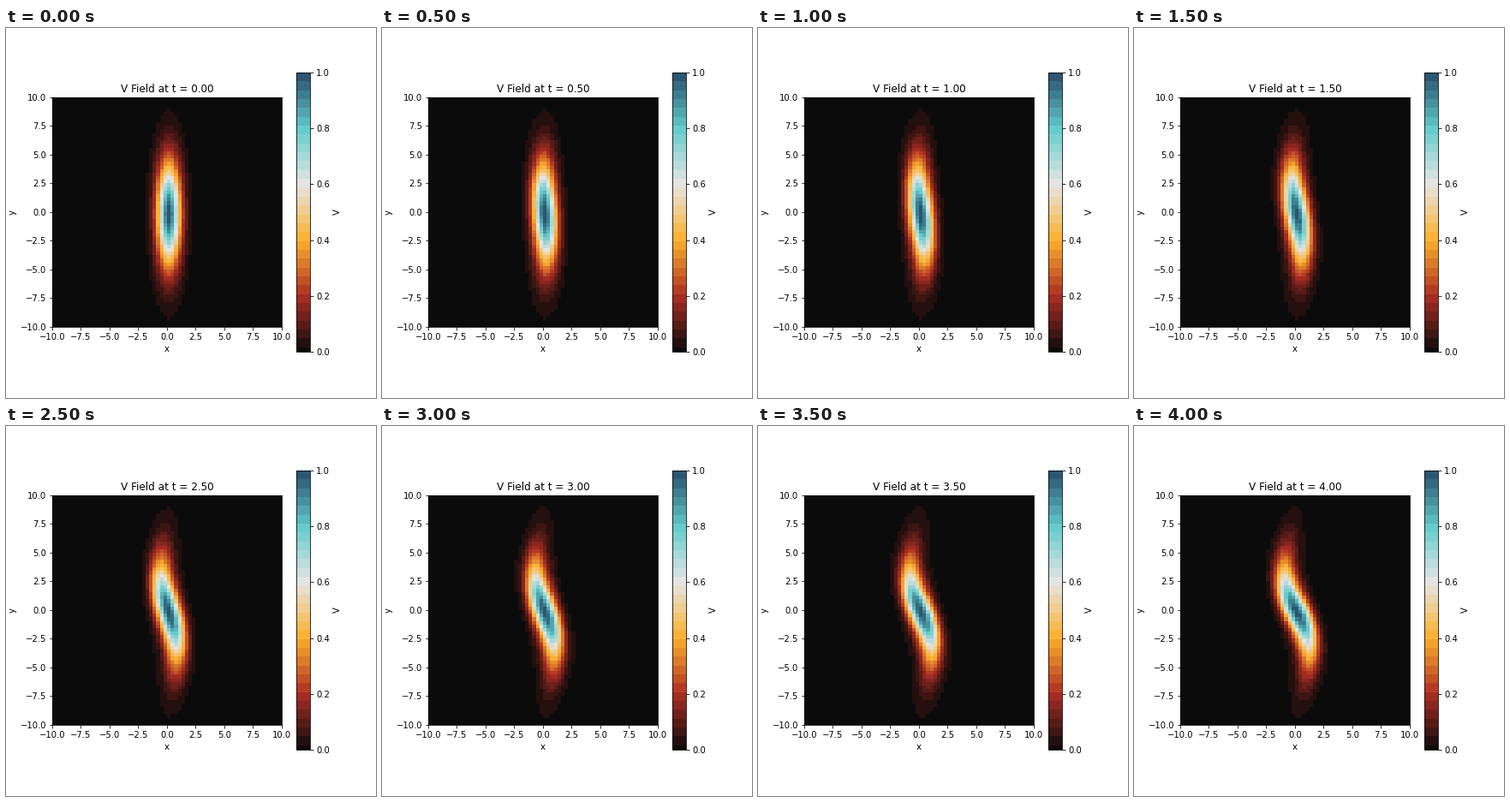
Write a matplotlib script that moves like this. It is 432 by 432 pixels and loops after 4500 ms.

```python
import numpy as np
import matplotlib.pyplot as plt
from matplotlib.animation import FuncAnimation
from matplotlib.colors import LinearSegmentedColormap, ListedColormap

N, SIDE, NU = 64, 20.0, 0.001
H = SIDE / N
STEP, SUBSTEPS, FRAMES = 0.5, 20, 9

grid = np.arange(N) * H - SIDE / 2
X, Y = np.meshgrid(grid, grid)
k = 2 * np.pi * np.fft.fftfreq(N, H)
KX, KY = np.meshgrid(k, k)
K2 = KX**2 + KY**2
K2[0, 0] = 1.0


def diff(f, axis):
    return (np.roll(f, -1, axis) - np.roll(f, 1, axis)) / (2 * H)


def laplacian(f):
    near = sum(np.roll(f, s, a) for s in (-1, 1) for a in (0, 1))
    return (near - 4 * f) / H**2


def rate(w):
    """Vorticity advection plus weak diffusion, rows running downwards."""
    spec = -np.fft.fft2(w) / K2
    spec[0, 0] = 0
    psi = np.fft.ifft2(spec).real
    turn = diff(psi, 1) * diff(w, 0) - diff(psi, 0) * diff(w, 1)
    return turn + NU * laplacian(w)


def advance(w):
    dt = STEP / SUBSTEPS
    for _ in range(SUBSTEPS):
        a = rate(w)
        b = rate(w + dt / 2 * a)
        c = rate(w + dt / 2 * b)
        d = rate(w + dt * c)
        w = w + dt / 6 * (a + 2 * b + 2 * c + d)
    return w


def banded_map():
    """Smooth ramp cut into a half-width first band and 31 full ones."""
    ramp = LinearSegmentedColormap.from_list(
        "ramp", ["#0b0b0b", "#ad2e24", "#fbb02d",
                 "#e5e5e5", "#63ccca", "#274c6b"])
    mids = np.r_[0, np.repeat(2 * np.arange(1, 32), 2)] / 63
    return ListedColormap(ramp(mids))


fields = [np.exp(-X**2 - Y**2 / 20)]
while len(fields) < FRAMES:
    fields.append(advance(fields[-1]))

plt.rcParams.update({"font.family": "DejaVu Sans", "font.size": 10})
fig, ax = plt.subplots(figsize=(6, 6), dpi=72, facecolor="white")
fig.subplots_adjust(left=0.125, right=0.9, bottom=0.125, top=0.88)
half = SIDE / 2
image = ax.imshow(fields[0], cmap=banded_map(), vmin=0, vmax=1,
                  extent=[-half, half, -half, half], interpolation="nearest")
fig.colorbar(image, ax=ax, label="V")
ax.set_xlabel("x")
ax.set_ylabel("y")
ticks = np.linspace(-half, half, 9)
ax.set_xticks(ticks)
ax.set_yticks(ticks)
title = ax.set_title("V Field at t = 0.00")


def draw(i):
    image.set_data(fields[i])
    title.set_text(f"V Field at t = {i * STEP:.2f}")
    return image, title


anim = FuncAnimation(fig, draw, frames=FRAMES, interval=500,
                     repeat=True, repeat_delay=0, blit=False)
plt.show()
```
